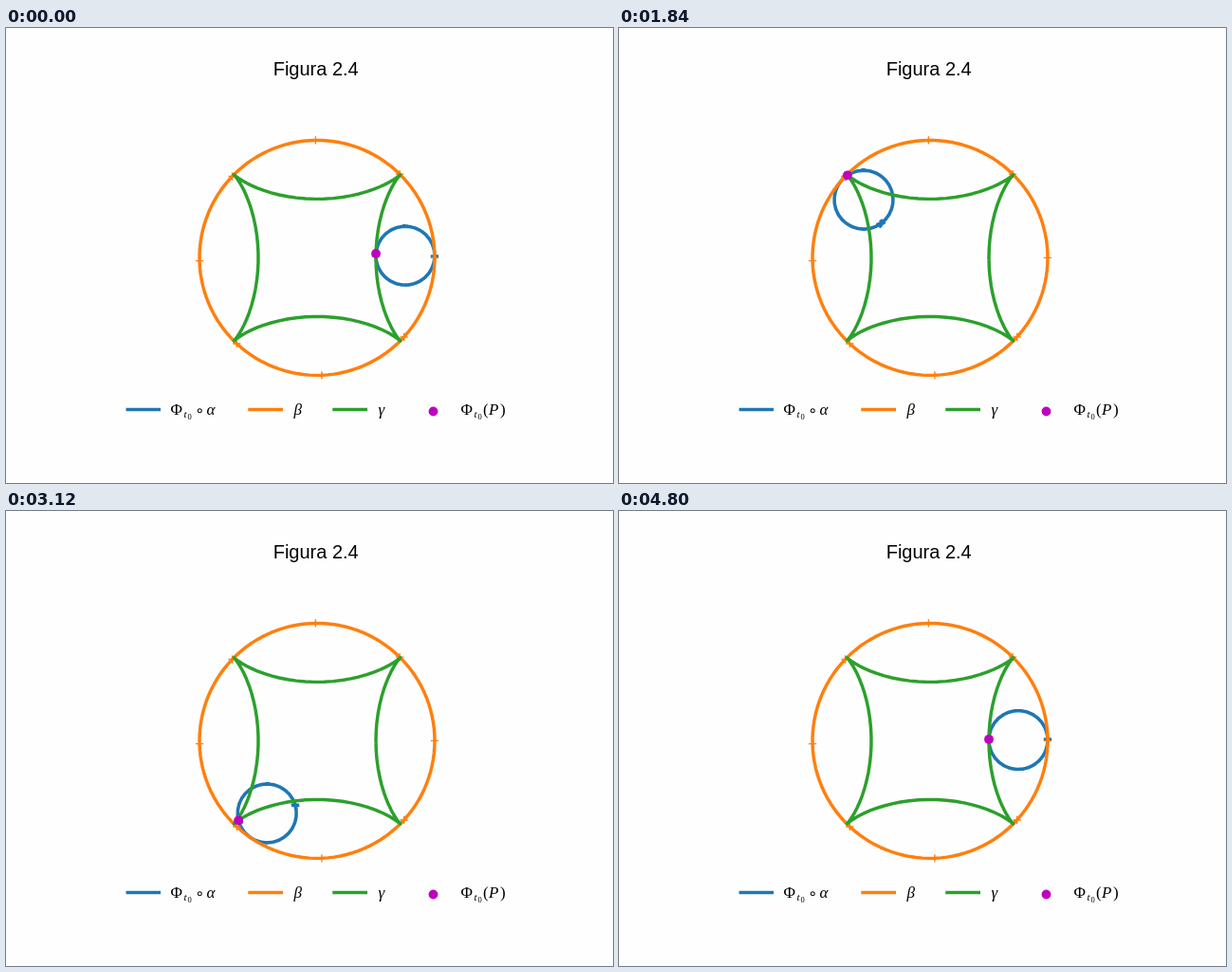
Write an HTML page that moves like this. It is 640 px wide and 480 px high and loops after 4840 ms.

```html
<!DOCTYPE html>
<html lang="it">
<head>
<meta charset="utf-8">
<title>Figura 2.4</title>
<style>
  html, body { margin: 0; width: 100%; height: 100%; overflow: hidden; background: #fefefe; }
  svg { display: block; width: 640px; height: 480px; }
  .line { fill: none; stroke-width: 3.47; stroke-linejoin: round; stroke-linecap: square; }
  .mark { fill: none; stroke-width: 1.39; }
  .blue { stroke: #1f77b4; }
  .orange { stroke: #ff7f0e; }
  .green { stroke: #2ca02c; }
  .dot { fill: #bf00bf; }
  .title { font: 20px "Liberation Sans", Arial, sans-serif; }
  .math { font: 17px "Liberation Serif", "Times New Roman", serif; }
  .it { font-style: italic; }
  .sub { font-size: 11px; font-style: italic; }
  .subsub { font-size: 8.5px; }
  .op { font: 16px "DejaVu Sans", sans-serif; }
</style>
</head>
<body>
<svg viewBox="0 0 640 480">
  <text class="title" x="281.7" y="50">Figura 2.4</text>

  <path id="wheel" class="line blue"/>
  <path id="wheelMarks" class="mark blue"/>
  <path id="ring" class="line orange"/>
  <path id="ringMarks" class="mark orange"/>
  <path id="trace" class="line green"/>
  <circle id="point" class="dot" r="4.9"/>

  <path class="line blue" d="M128.3 402.5H161.3"/>
  <path class="line orange" d="M257 402.5H290.3"/>
  <path class="line green" d="M346 402.5H379.3"/>
  <circle class="dot" cx="450.5" cy="404.5" r="4.9"/>

  <g class="math">
    <text x="173.5" y="408">Φ</text>
    <text class="sub" x="187.5" y="410.5">t</text>
    <text class="subsub" x="191.5" y="412.5">0</text>
    <text class="op" x="199" y="409">∘</text>
    <text class="it" x="211.5" y="408">α</text>
    <text class="it" x="303.5" y="408">β</text>
    <text class="it" x="392.5" y="408">γ</text>
    <text x="479.5" y="408">Φ</text>
    <text class="sub" x="493.5" y="410.5">t</text>
    <text class="subsub" x="497.5" y="412.5">0</text>
    <text x="503" y="408">(</text>
    <text class="it" x="509" y="408">P</text>
    <text x="521" y="408">)</text>
  </g>
</svg>
<script>
const CX = 328, CY = 242.4, R = 124, r = R / 4;
const COUNT = 120, STEP = 360 / (COUNT - 1), SPIN = 12.05;
const FRAME_MS = 40, FRAMES = 121;

const el = id => document.getElementById(id);
const polar = (x, y, radius, deg) => {
  const a = deg * Math.PI / 180;
  return [x + radius * Math.cos(a), y - radius * Math.sin(a)];
};
const fmt = p => p.map(v => v.toFixed(2)).join(" ");
const sample = f => Array.from({ length: COUNT }, (_, k) => f(k));
const polyline = pts => "M" + pts.map(fmt).join("L");
const plus = ([x, y]) => `M${fmt([x - 4.17, y])}h8.34M${fmt([x, y - 4.17])}v8.34`;
const marks = pts => pts.filter((_, k) => k % 15 === 0).map(plus).join("");

// Centre of the rolling circle and the point fixed to its rim
const hub = deg => polar(CX, CY, R - r, deg);
const rim = deg => polar(...hub(deg), r, 180 - 3 * deg);

const ringPts = sample(k => polar(CX, CY, R, k * STEP));
el("ring").setAttribute("d", polyline(ringPts));
el("ringMarks").setAttribute("d", marks(ringPts));
el("trace").setAttribute("d", polyline(sample(k => rim(k * STEP))));

function draw(ms) {
  const i = Math.floor(ms / FRAME_MS) % FRAMES;
  const deg = Math.min(360.5, Math.max(1.35, 3.018 * i));
  const [x, y] = hub(deg);
  const pts = sample(k => polar(x, y, r, k * SPIN - 3 * deg));
  el("wheel").setAttribute("d", polyline(pts));
  el("wheelMarks").setAttribute("d", marks(pts));
  const [px, py] = rim(deg);
  el("point").setAttribute("cx", px.toFixed(2));
  el("point").setAttribute("cy", py.toFixed(2));
}

const start = performance.now();
function tick() {
  draw(performance.now() - start);
  requestAnimationFrame(tick);
}
tick();
</script>
</body>
</html>
```
